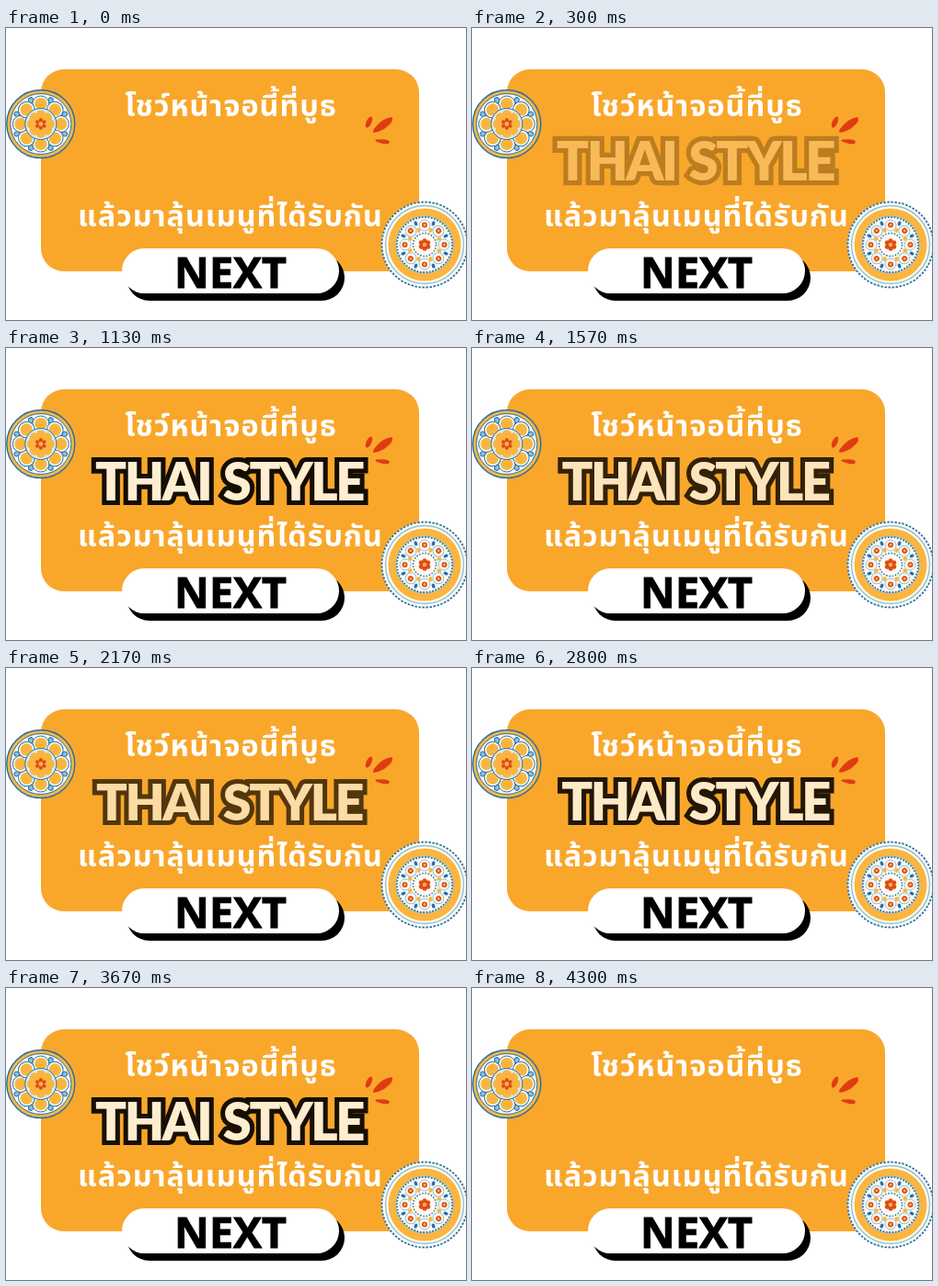
An HTML page for the animation above (5010 ms loop, 500 by 318 pixels).

```html
<!DOCTYPE html>
<html lang="th">
<head>
<meta charset="utf-8">
<title>Thai Style</title>
<style>
  html, body { margin: 0; width: 100%; height: 100%; overflow: hidden; background: #fff; }
  svg { display: block; width: 500px; height: 318px; }
  .thai {
    font: bold 32.3px "Noto Sans Thai", "Noto Sans", sans-serif;
    letter-spacing: 1px; fill: #fff; text-anchor: middle;
  }
  .next {
    font: bold 46.5px "Open Sans", "Noto Sans", sans-serif;
    text-anchor: middle; stroke: #000; stroke-width: 1px;
  }
  .title {
    font: 900 55.5px Lato, "Liberation Sans", sans-serif;
    letter-spacing: -2.4px; word-spacing: 3px; text-anchor: middle;
    fill: #fff3dd; stroke: #050300; stroke-width: 10px; stroke-linejoin: miter;
    stroke-miterlimit: 3; paint-order: stroke;
  }
  #zoom, #glow { transform-origin: 243px 146px; }
  #zoom { animation: zoom 5010ms infinite; }
  #glow { animation: glow 5010ms infinite cubic-bezier(.37, 0, .63, 1); }

  /* zoom: in 0-530 ms, out 3850-4300 ms */
  @keyframes zoom {
    0% { transform: scale(1.28); animation-timing-function: cubic-bezier(.3, .5, .5, 1); }
    10.58%, 76.85% { transform: none; animation-timing-function: cubic-bezier(.5, 0, .7, .5); }
    85.83%, 100% { transform: scale(1.28); }
  }
  /* glow: dips at 1930 and 3230 ms */
  @keyframes glow {
    0% { opacity: 0; transform: none; animation-timing-function: linear; }
    13% { opacity: .54; transform: none; }
    25.55% { opacity: 1; transform: scale(1.012); }
    38.52% { opacity: .55; transform: none; }
    51.5% { opacity: 1; transform: scale(1.012); }
    64.47% { opacity: .55; transform: none; }
    76.5% { opacity: 1; transform: scale(1.012); animation-timing-function: linear; }
    85.7%, 100% { opacity: 0; transform: scale(1.012); }
  }
</style>
</head>
<body>
<svg viewBox="0 0 500 318">
  <rect x="38" y="45" width="411" height="220" rx="25" fill="#f9a72b"/>
  <g fill="#e03c14">
    <ellipse cx="394.500" cy="102.500" rx="2.800" ry="6.500" transform="rotate(24 394.500 102.500)"/>
    <path d="M419 97q3 3-2 8q-8 8-17 9q-2-1 0-4q9-12 19-13z"/>
    <path d="M402 121.500q9-1 14 1q2 2-1 4q-6 0-13-3q-1-1 0-2z"/>
  </g>

  <text class="thai" x="244.500" y="96">โชว์หน้าจอนี้ที่บูธ</text>
  <text class="thai" x="244" y="216">แล้วมาลุ้นเมนูที่ได้รับกัน</text>

  <g id="zoom"><g id="glow">
    <text class="title" x="242.500" y="165.500">THAI STYLE</text>
  </g></g>

  <g id="left" transform="translate(37.800 104.500)"></g>
  <g id="right" transform="translate(455 236)"></g>

  <rect x="131" y="247" width="237" height="50" rx="25"/>
  <rect x="126" y="240" width="236" height="49" rx="24.500" fill="#fff"/>
  <text class="next" x="244" y="282.500">NEXT</text>
</svg>
<script>
  const BLUE = '#2270ad', SKY = '#8fc0d8', PALE = '#dcecee', GOLD = '#f9b540', RED = '#df4a1c', CREAM = '#fffaf0';

  function add(parent, tag, attrs) {
    const el = document.createElementNS('http://www.w3.org/2000/svg', tag);
    for (const k in attrs) el.setAttribute(k, attrs[k]);
    parent.append(el);
    return el;
  }
  const disc = (g, r, fill, stroke = 'none', width = 1) =>
    add(g, 'circle', { r, fill, stroke, 'stroke-width': width });

  // dashed circle with n equal dashes
  const dashes = (g, r, n, stroke, width, share = .5) => {
    const step = 2 * Math.PI * r / n;
    add(g, 'circle', { r, fill: 'none', stroke, 'stroke-width': width,
      'stroke-dasharray': `${step * share} ${step * (1 - share)}` });
  };
  // n ellipses around the centre
  const petals = (g, n, dist, rx, ry, fill, stroke = 'none', shift = 0) => {
    for (let i = 0; i < n; i++) {
      add(g, 'ellipse', { cy: -dist, rx, ry, fill, stroke,
        transform: `rotate(${(i + shift) * 360 / n})` });
    }
  };

  const left = document.getElementById('left');
  disc(left, 37, GOLD, BLUE, 1.4);
  disc(left, 33, CREAM, BLUE);
  petals(left, 8, 28, 2.5, 3, SKY, BLUE, .5);
  petals(left, 8, 22, 9, 8.5, CREAM, BLUE);
  petals(left, 8, 22, 6.8, 6.5, GOLD);
  disc(left, 17, PALE, BLUE);
  petals(left, 8, 11, 5, 4, GOLD);
  disc(left, 12, GOLD);
  petals(left, 6, 4, 2, 2.4, RED);
  disc(left, 2.4, GOLD);

  const right = document.getElementById('right');
  disc(right, 47, CREAM);
  dashes(right, 46.5, 72, BLUE, 1.8, .6);
  disc(right, 42.5, CREAM, SKY, 1.4);
  disc(right, 39.5, GOLD);
  disc(right, 31, CREAM, SKY);
  dashes(right, 30, 56, BLUE, 1.8);
  petals(right, 8, 21, 6, 6, CREAM, SKY);
  petals(right, 8, 21.5, 3, 3, RED);
  petals(right, 8, 21.5, 1.4, 1.4, GOLD);
  petals(right, 8, 25, 1.8, 2.6, BLUE, 'none', .5);
  petals(right, 8, 17, 2, 2.6, GOLD, 'none', .5);
  dashes(right, 12.5, 24, BLUE, 1.4);
  disc(right, 11, CREAM);
  petals(right, 6, 4, 2.5, 2.8, RED);
  disc(right, 2.2, GOLD);
</script>
</body>
</html>
```
